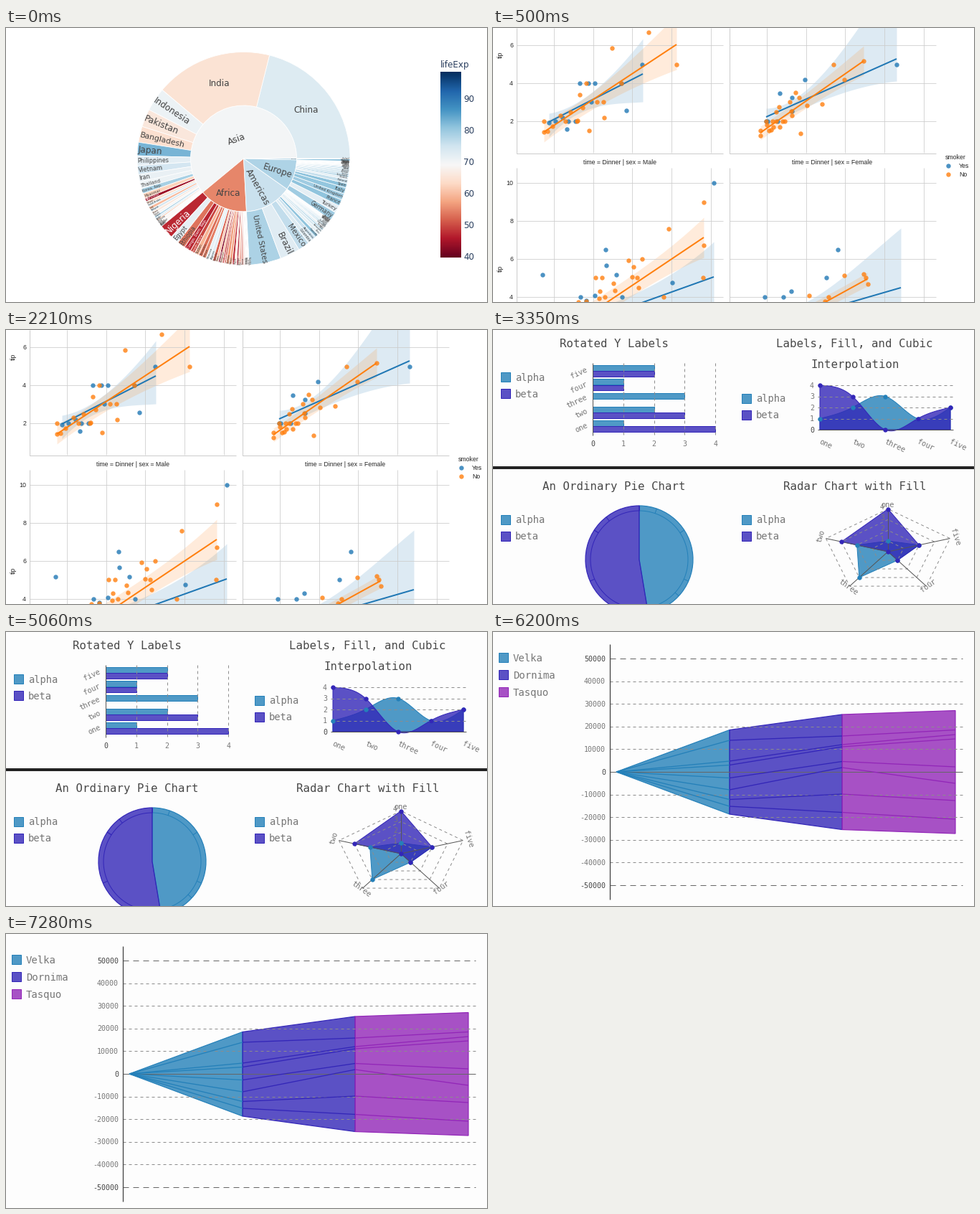
Animation of 671 by 382 pixels, one loop 8000 ms. Source, as a matplotlib script:

```python
import math

import matplotlib.pyplot as plt
import numpy as np
from matplotlib.animation import FuncAnimation
from matplotlib.patches import Circle, Polygon, Rectangle, Wedge
from matplotlib.textpath import TextPath

W, H, DPI = 671, 382, 64
PX = 72 / DPI  # points per pixel
STEP, LOOP = 50, 8000
STARTS = [0, 500, 3350, 6200]

SANS, ARIAL, MONO = "DejaVu Sans", "Liberation Sans", "DejaVu Sans Mono"
BLUE, VIOLET, PLUM = (36/255, 128/255, 185/255), (51/255, 38/255, 184/255), (146/255, 38/255, 184/255)
INK, GREY, PALE = "#444444", "#777777", "#8c8c8c"

fig = plt.figure(figsize=(W / DPI, H / DPI), dpi=DPI, facecolor="white")


def stage(color):
    ax = fig.add_axes([0, 0, 1, 1])
    ax.set(xlim=(0, W), ylim=(H, 0))
    ax.axis("off")
    ax.add_patch(Rectangle((0, 0), W, H, color=color, zorder=-5))
    return ax


def text(ax, x, y, s, size, color=INK, font=SANS, ha="center", rot=0):
    """Write s with the middle of its capitals at y."""
    a, drop = math.radians(rot), 0.36 * size
    ax.text(x + drop * math.sin(a), y + drop * math.cos(a), s, fontsize=size * PX,
            color=color, family=font, ha=ha, va="baseline", rotation=rot,
            rotation_mode="anchor")


def line(ax, xs, ys, color, width=1, dash=None, **kw):
    style = (0, dash) if dash else "-"
    ax.plot(xs, ys, color=color, lw=width * PX, ls=style, dash_capstyle="butt",
            solid_capstyle="butt", **kw)


def dots(ax, pts, color, radius=3.2, alpha=1):
    xs, ys = zip(*pts)
    ax.plot(xs, ys, "o", ms=2 * radius * PX, color=color, mew=0, alpha=alpha)


def shape(ax, pts, color, width=1):
    ax.add_patch(Polygon(pts, fc=(*color, 0.8), ec=color, lw=width * PX))


def box(ax, x, y, w, h, color):
    shape(ax, [(x, y), (x + w, y), (x + w, y + h), (x, y + h)], color)


# ---- sunburst ----

CX, CY, R_IN, R_OUT = 331.5, 182, 74, 148.5
LIFE_MIN, LIFE_MAX = 39.6, 98.2
WORLD = 6251

# continent: population (millions), mean life, (country, population, life), smaller ones
ASIA = (3812, 69.4, [
    ("China", 1318.7, 73), ("India", 1110.4, 64.7), ("Indonesia", 223.5, 70.7),
    ("Pakistan", 169.3, 65.5), ("Bangladesh", 150.4, 64.1), ("Japan", 127.5, 82.6),
    ("Philippines", 91.1, 71.7), ("Vietnam", 85.3, 74.2), ("Iran", 69.5, 71),
    ("Thailand", 65.1, 70.6), ("Korea, Rep.", 49, 78.6), ("Myanmar", 47.8, 62.1),
    ("Afghanistan", 31.9, 43.8), ("Nepal", 28.9, 63.8), ("Saudi Arabia", 27.6, 72.8),
    ("Iraq", 27.5, 59.5), ("Malaysia", 24.8, 74.2)],
    "Korea Taiwan Yemen Lanka Syria Cambodia Israel Jordan Singapore Lebanon Oman Kuwait")
AFRICA = (929.5, 54.6, [
    ("Nigeria", 135, 46.9), ("Egypt", 80.3, 71.3), ("Ethiopia", 76.5, 53),
    ("Congo, Dem. Rep.", 64.6, 46.5), ("South Africa", 44, 49.3), ("Sudan", 42.3, 58.6),
    ("Tanzania", 38.1, 52.5), ("Kenya", 35.6, 54.1), ("Morocco", 33.8, 71.2),
    ("Algeria", 33.3, 72.3), ("Uganda", 29.2, 51.5), ("Ghana", 22.9, 60),
    ("Mozambique", 20, 42.1), ("Madagascar", 19.2, 59.4), ("Cote d'Ivoire", 18, 48.3),
    ("Cameroon", 17.7, 50.4)],
    "Burkina Malawi Niger Angola Zimbabwe Senegal Mali Zambia Tunisia Chad Guinea "
    "Somalia Rwanda Burundi Benin Libya Togo Eritrea Liberia Namibia Gabon")
AMERICAS = (898.9, 75.4, [
    ("United States", 301.1, 78.2), ("Brazil", 190, 72.4), ("Mexico", 108.7, 76.2),
    ("Colombia", 44.2, 72.9), ("Argentina", 40.3, 75.3), ("Canada", 33.4, 80.7),
    ("Peru", 28.7, 71.4), ("Venezuela", 26.1, 73.7), ("Chile", 16.3, 78.6),
    ("Ecuador", 13.8, 75), ("Guatemala", 12.6, 70.3), ("Cuba", 11.4, 78.3)],
    "Dominica Bolivia Haiti Honduras Salvador Paraguay Nicaragua Uruguay Panama Jamaica")
EUROPE = (586.1, 77.9, [
    ("Germany", 82.4, 79.4), ("Turkey", 71.2, 71.8), ("France", 61.1, 80.7),
    ("United Kingdom", 60.8, 79.4), ("Italy", 58.1, 80.5), ("Spain", 40.4, 80.9),
    ("Poland", 38.5, 75.6), ("Romania", 22.3, 72.5), ("Netherlands", 16.6, 79.8)],
    "Greece Portugal Belgium Czech Serbia Hungary Sweden Austria Swiss Bulgaria "
    "Denmark Slovakia Finland Norway Croatia Bosnia Ireland Albania Slovenia")
OCEANIA = (24.5, 80.7, [("Australia", 20.4, 81.2), ("Zealand", 4.1, 80.2)], "")


def life_color(life):
    return plt.get_cmap("RdBu")((life - LIFE_MIN) / (LIFE_MAX - LIFE_MIN))


def contrast(color):
    r, g, b = color[:3]
    return "white" if 0.299 * r + 0.587 * g + 0.114 * b < 0.5 else INK


def polar(r, deg):
    a = math.radians(deg)
    return CX + r * math.cos(a), CY - r * math.sin(a)


def slice_(ax, r, start, span, life, width):
    ax.add_patch(Wedge((CX, CY), r, -start - span, -start, width=width,
                       fc=life_color(life), ec="white", lw=0.8 * PX))


def radial_label(ax, name, start, span, color):
    """Fit a label along the radius with its outer end on the rim."""
    em = TextPath((0, 0), name, size=100).get_extents().width / 100
    arc = math.radians(span)
    size = max(2.6, min(12, 67 / em, R_OUT * arc / (1.2 + em * arc)))
    mid = start + span / 2
    x, y = polar(R_OUT - 1 - em * size / 2, mid)
    rot = mid - 180 if 90 < mid < 270 else mid
    text(ax, x, y, name, size, color, rot=rot)


def sunburst():
    ax = stage("white")
    rng = np.random.default_rng(4)
    start = 0
    for pop, mean, big, rest in (ASIA, AFRICA, AMERICAS, EUROPE, OCEANIA):
        slice_(ax, R_IN, start, pop / WORLD * 360, mean, None)
        small = rest.split()
        share = 0.87 ** np.arange(len(small))
        left = pop - sum(c[1] for c in big)
        pops = left * share / share.sum() if small else []
        lives = mean + rng.normal(0, 5 if mean < 72 else 2.5, len(small))
        a = start
        for name, size, life in big + list(zip(small, pops, lives)):
            span = size / WORLD * 360
            slice_(ax, R_OUT, a, span, life, R_OUT - R_IN)
            if span > 30:
                text(ax, *polar(111, a + span / 2), name, 12)
            else:
                radial_label(ax, name, a, span, contrast(life_color(life)))
            a += span
        start += pop / WORLD * 360

    text(ax, 321, 155, "Asia", 12, rot=19.8)
    text(ax, 310.5, 230, "Africa", 12)
    text(ax, 351, 221, "Americas", 12, rot=-61)
    text(ax, 379, 198.5, "Europe", 12, rot=-18)
    text(ax, 402, 182, "Oceania", 1.8)

    navy = "#2a3f5f"
    ax.imshow(np.linspace(1, 0, 256)[:, None], cmap="RdBu", aspect="auto",
              extent=(606, 635, 320.5, 61.5), interpolation="bilinear")
    ax.set(xlim=(0, W), ylim=(H, 0))
    text(ax, 605.5, 50.5, "lifeExp", 12, navy, ha="left")
    for i, value in enumerate(range(90, 39, -10)):
        text(ax, 638, 98.5 + 44.1 * i, str(value), 12, navy, ha="left")


# ---- regression grid ----

def fit(ax, color, pts, ends, upper, lower):
    """Points, regression line and a smooth confidence band."""
    dots(ax, pts, color, alpha=0.8)
    (x0, y0), (x1, y1) = ends
    knots, xs = np.linspace(0, 1, 4), np.linspace(0, 1, 60)
    top, low = (np.polyval(np.polyfit(knots, e, 3), xs) for e in (upper, lower))
    ax.fill_between(x0 + (x1 - x0) * xs, top, low, color=color, alpha=0.15, lw=0)
    line(ax, [x0, x1], [y0, y1], color, 2)


def regression():
    ax = stage("white")
    blue, orange, grid, dark = "#1f77b4", "#ff7f0e", "#cccccc", "#262626"
    for left in (33, 330):
        for i in range(5):
            x = left + 52 + 54.7 * i
            line(ax, [x, x], [0, 174], grid, 0.8)
            line(ax, [x, x], [195, H], grid, 0.8)
        for y in (24, 77, 130, 216, 269, 322, 375):
            line(ax, [left, left + 288], [y, y], grid, 0.8)
        line(ax, [left, left, left + 288], [0, 174.5, 174.5], grid)
        line(ax, [left, left], [195, H], grid)

    fit(ax, blue, [(78, 132), (87, 130), (97, 125), (103, 141), (105, 130), (115, 130),
                   (121, 77), (133, 77), (142, 77), (137, 103), (179, 77), (186, 115),
                   (208, 51)],
        [(78, 131), (209, 64)], [119, 101, 65, 15], [152, 118, 106, 103])
    fit(ax, orange, [(71, 130), (71, 145), (76, 144), (83, 137), (94, 122), (101, 130),
                     (108, 117), (117, 130), (118, 129), (121, 93), (125, 111), (130, 77),
                     (134, 143), (145, 103), (154, 103), (155, 125), (166, 28), (179, 77),
                     (217, 6), (256, 51)],
        [(71, 145), (256, 23)], [131, 94, 42, -18], [159, 117, 84, 58])

    fit(ax, blue, [(381, 130), (383, 130), (397, 130), (400, 91), (417, 97), (417, 116),
                   (435, 72), (563, 51)],
        [(381, 124), (563, 43)], [112, 82, 10, -80], [137, 108, 86, 74])
    fit(ax, orange, [(373, 143), (373, 150), (381, 130), (382, 135), (385, 143), (388, 142),
                     (391, 138), (390, 130), (395, 130), (395, 117), (399, 110), (400, 138),
                     (404, 130), (407, 130), (414, 103), (416, 116), (417, 122), (422, 90),
                     (427, 97), (429, 147), (438, 108), (459, 106), (475, 51), (490, 72),
                     (517, 46)],
        [(373, 146), (517, 46)], [137, 103, 65, 25], [156, 122, 92, 66])

    fit(ax, blue, [(69, 344), (157, 309), (158, 331), (172, 344), (122, 375), (130, 380),
                   (142, 373), (180, 375), (250, 355), (308, 216)],
        [(100, 421.5), (308, 347)], [405, 382, 349, 298], [440, 412, 397, 395])
    fit(ax, orange, [(294, 243), (245, 280), (294, 303), (189, 324), (208, 322), (196, 333),
                     (194, 347), (201, 348), (143, 348), (152, 348), (203, 362), (168, 356),
                     (149, 367), (148, 377), (170, 366), (119, 382), (130, 381), (156, 375),
                     (238, 375), (293, 348)],
        [(100, 422), (294, 292)], [405, 364, 319, 264], [440, 393, 352, 320])

    fit(ax, blue, [(379, 375), (405, 375), (416, 367), (465, 348), (481, 309)],
        [(379, 417), (569, 362)], [400, 379, 333, 279], [440, 440, 450, 480])
    fit(ax, orange, [(441, 373), (468, 375), (463, 381), (490, 345), (517, 343), (520, 348),
                     (523, 357)],
        [(400, 417), (522, 350)], [408, 386, 364, 341], [426, 403, 381, 360])

    def label(x, y, s, **kw):
        text(ax, x, y, s, 8.75, dark, ARIAL, **kw)

    for s, y in (("6", 24), ("4", 77), ("2", 130), ("10", 216), ("8", 269), ("6", 322),
                 ("4", 375)):
        label(28, y, s, ha="right")
    label(10, 37, "tip", rot=90)
    label(10, 335, "tip", rot=90)
    label(177, 187, "time = Dinner | sex = Male")
    label(473.5, 187, "time = Dinner | sex = Female")
    label(645, 179.5, "smoker")
    for s, y, c in (("Yes", 191.5, blue), ("No", 203.5, orange)):
        dots(ax, [(634.5, y)], c, alpha=0.8)
        label(650, y, s, ha="left")


# ---- four small charts ----

NAMES = ["one", "two", "three", "four", "five"]
ALPHA, BETA = [1, 2, 3, 1, 2], [4, 3, 0, 1, 2]
SERIES = ((ALPHA, BLUE), (BETA, VIOLET))
DASH = (4, 4)


def legend(ax, x, y, names, colors, gap, size):
    for i, (name, color) in enumerate(zip(names, colors)):
        box(ax, x, y + gap * i, 13, 13, color)
        text(ax, x + 20, y + gap * i + 6.8, name, size, GREY, MONO, "left")


def spline(ys, xs):
    """Natural cubic spline through ys at 0, 1, 2, ..."""
    n = len(ys)
    y = np.array(ys, float)
    m, rhs = np.eye(n), np.zeros(n)
    for i in range(1, n - 1):
        m[i, i - 1:i + 2] = 1, 4, 1
        rhs[i] = 6 * (y[i - 1] - 2 * y[i] + y[i + 1])
    k = np.linalg.solve(m, rhs)
    i = np.minimum(xs.astype(int), n - 2)
    b = xs - i
    a = 1 - b
    return a * y[i] + b * y[i + 1] + ((a**3 - a) * k[i] + (b**3 - b) * k[i + 1]) / 6


def bars(ax):
    for i in range(5):
        x = 139 + 42.8 * i
        line(ax, [x, x], [46, 147], "#555555" if i == 0 else PALE, 1, DASH if i else None)
        text(ax, x, 158, str(i), 10, INK if i == 0 else GREY, MONO)
    for i, name in enumerate(NAMES):
        y = 126 - 19.2 * i
        for k, (values, color) in enumerate(SERIES):
            if values[i]:
                box(ax, 139, y + 8.1 * k, 42.8 * values[i], 7.9, color)
        text(ax, 131, y + 5.5, name, 10.3, GREY, MONO, "right", 25)


def cubic(ax):
    xs = np.linspace(0, 4, 120)
    for v in range(5):
        y = 139 - 15.5 * v
        line(ax, [453, 642], [y, y], "#555555" if v == 0 else PALE, 1, DASH if v else None)
        text(ax, 445, y, str(v), 10, INK if v == 0 else GREY, MONO)
    for values, color in SERIES:
        px, py = 456 + 45.5 * xs, 139 - 15.5 * spline(values, xs)
        shape(ax, [(456, 139), *zip(px, py), (638, 139)], color)
        dots(ax, [(456 + 45.5 * i, 139 - 15.5 * v) for i, v in enumerate(values)], color, 3.2)
    for i, name in enumerate(NAMES):
        text(ax, 456 + 45.5 * i, 154.5, name, 10.3, GREY, MONO, "left", -25)


def pie(ax):
    cx, cy, r, ring, turn = 204, 320, 75, 68, 360 / 19
    a = -90
    for values, color in SERIES:
        span = sum(values) * turn
        ax.add_patch(Wedge((cx, cy), r, a, a + span, fc=(*color, 0.8), ec=color, lw=1.2 * PX))
        t = np.radians(np.linspace(a, a + span, 80))
        line(ax, cx + ring * np.cos(t), cy + ring * np.sin(t), color)
        for v in values:
            a += v * turn
            t, ends = math.radians(a), np.array([ring, r])
            line(ax, cx + ends * math.cos(t), cy + ends * math.sin(t), color)


def radar(ax):
    cx, cy = 551, 309

    def spot(i, v):
        t = math.radians(72 * i)
        return cx - 91 * v / 4 * math.sin(t), cy - 59.5 * v / 4 * math.cos(t)

    for v in range(1, 5):
        line(ax, *zip(*[spot(i, v) for i in range(6)]), PALE, 1, DASH)
        text(ax, 543, 306 - 15 * v, str(v), 10, GREY, MONO)
    for i in range(5):
        line(ax, *zip((cx, cy), spot(i, 4)), "#555555")
    for values, color in SERIES:
        pts = [spot(i, v) for i, v in enumerate(values)]
        shape(ax, pts, color)
        dots(ax, pts, color, 3.2)
    for name, x, y, rot in zip(NAMES, (551, 457, 496, 607, 645), (243, 287, 358, 356, 289),
                               (0, 72, -36, 36, -72)):
        text(ax, x, y, name, 10.3, GREY, MONO, rot=rot)


def gallery():
    ax = stage("#fdfdfd")
    for x, y in ((11, 59), (347, 88.5), (11, 257.5), (347, 257.5)):
        legend(ax, x, y, ("alpha", "beta"), (BLUE, VIOLET), 23, 13.7)
    for s, x, y in (("Rotated Y Labels", 169, 18.5), ("Labels, Fill, and Cubic", 504, 18.5),
                    ("Interpolation", 505, 47.5), ("An Ordinary Pie Chart", 168.5, 217),
                    ("Radar Chart with Fill", 504.5, 217)):
        text(ax, x, y, s, 15.8, "#484848", MONO)
    for chart in (bars, cubic, pie, radar):
        chart(ax)
    ax.add_patch(Rectangle((0, 189.5), W, 4, fc="#222222", lw=0))


# ---- funnel ----

def funnel():
    ax = stage("#fdfdfd")
    colors = (BLUE, VIOLET, PLUM)
    legend(ax, 8, 29, ("Velka", "Dornima", "Tasquo"), colors, 24, 14)
    for v in range(-50000, 50001, 10000):
        y = 195 - v * 0.00316
        major = v % 50000 == 0
        dash = None if v == 0 else (8, 6) if major else DASH
        line(ax, [163, 655], [y, y], "#666666" if major else PALE, 1, dash)
        text(ax, 157, y, str(v), 10, INK if major else GREY, MONO, "right")
    line(ax, [163, 163], [17, 373], "#444444", 1.3)

    xs = (172, 330, 487, 645)
    edges = ([195] * 9,
             [136.5, 151, 180, 185.5, 203.5, 220, 233.5, 243, 254],
             [115, 145, 157, 160, 180.5, 189, 226, 251.5, 275.5],
             [109.5, 136.5, 143, 149, 188, 211, 235, 261, 281])
    for i, color in enumerate(colors):
        x, a, b = xs[i:i + 2], edges[i], edges[i + 1]
        shape(ax, [(x[0], a[0]), (x[1], b[0]), (x[1], b[-1]), (x[0], a[-1])], color, 1.2)
        for ends in zip(a[1:-1], b[1:-1]):
            line(ax, x, ends, color, 1.3)


def render(scene):
    scene()
    fig.canvas.draw()
    image = np.array(fig.canvas.buffer_rgba())
    fig.clear()
    return image


slides = [render(scene) for scene in (sunburst, regression, gallery, funnel)]
screen = fig.figimage(slides[0], origin="upper")


def update(i):
    screen.set_data(slides[np.searchsorted(STARTS, i * STEP, "right") - 1])
    return [screen]


anim = FuncAnimation(fig, update, frames=LOOP // STEP, interval=STEP, repeat=True)
plt.show()
```
